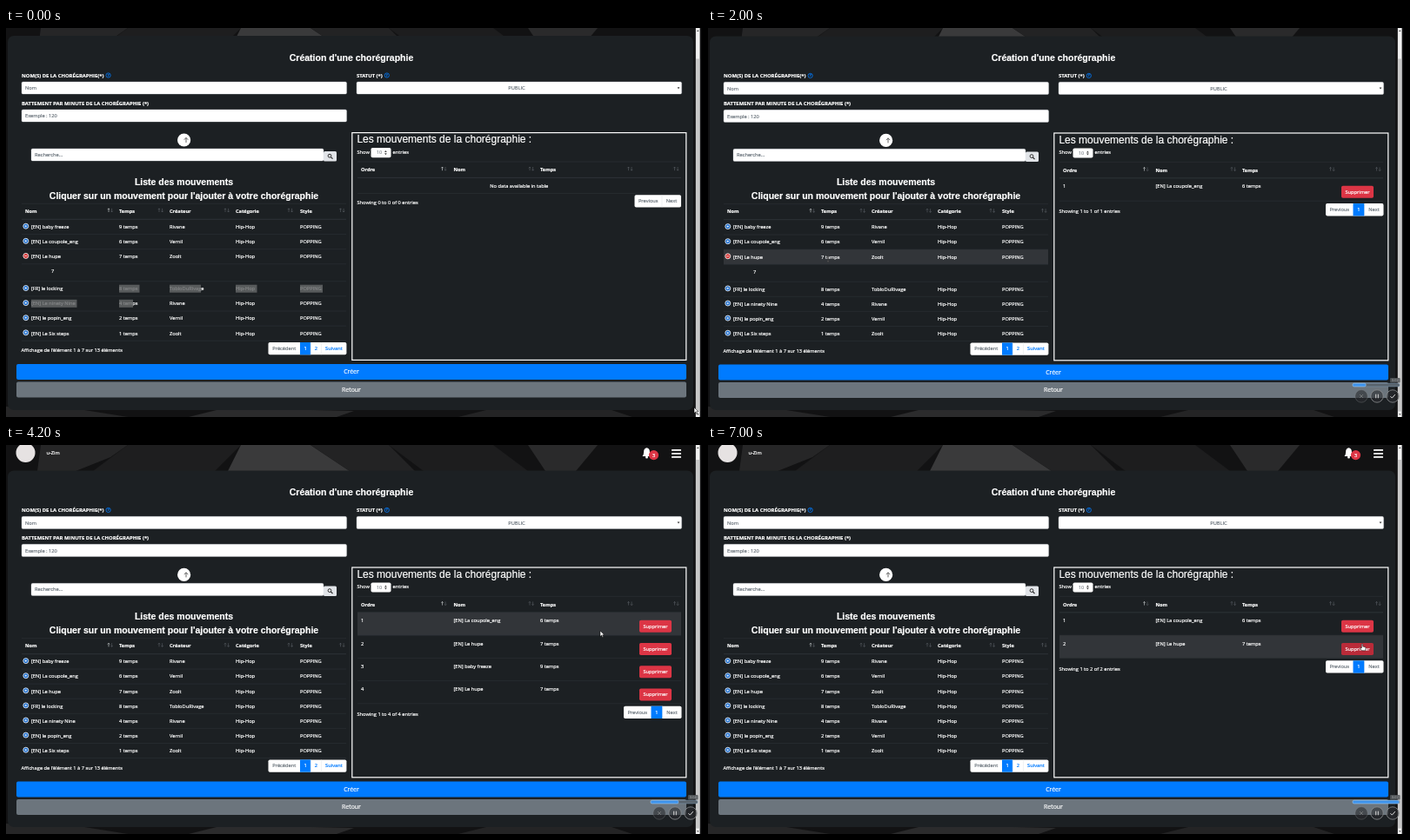
Write an HTML page that moves like this. It is 800 by 448 pixels and loops after 7.1 s.

```html
<!DOCTYPE html>
<html lang="fr">
<head>
<meta charset="utf-8">
<title>Création d'une chorégraphie</title>
<style>
html, body { margin: 0; width: 100%; height: 100%; overflow: hidden; background: #0b0b0c; }
svg { display: block; width: 800px; height: 448px; font-family: "Open Sans", "Noto Sans", sans-serif; }
text { stroke-width: .2px; }
.h { font-family: "Liberation Sans", Arial, sans-serif; }
</style>
</head>
<body>
<svg id="stage" viewBox="0 0 800 448"></svg>
<script>
const LOOP = 7100, STEP = 100;
const WHITE = '#fff', MUTED = '#6c757d', BLUE = '#007bff', RED = '#dc3545';
const CARD = '#1c2023', LINE = '#2d3237', HOVER = '#323539';
const stage = document.getElementById('stage');

const moves = [
  ['[EN] baby freeze', 9, 'Rivane'],
  ['[EN] La coupole_eng', 6, 'Vernil'],
  ['[EN] Le hupe', 7, 'Zoolt'],
  ['[FR] le locking', 8, 'TobloDuRivage'],
  ['[EN] Le ninety Nine', 4, 'Rivane'],
  ['[EN] le popin_eng', 2, 'Vernil'],
  ['[EN] Le Six steps', 1, 'Zoolt']
];
const FREEZE = 0, COUPOLE = 1, HUPE = 2;

// Moments of the clicks
const AT = { widget: 200, add1: 1700, add2: 2200, add3: 2700, fold: 3400, add4: 3800,
             grab: 5000, drop: 5700, del1: 6200, del2: 6600 };

// Pointer tip: time, x, y
const path = [
  [0, 791, 437], [100, 789, 437], [800, 695, 409], [1600, 140, 247], [1700, 140, 248],
  [2000, 138, 266], [2200, 136, 264], [2500, 100, 232], [2700, 88, 230], [3100, 30, 269.5],
  [3400, 22, 263], [3700, 60, 283], [3800, 62, 283], [4200, 683, 214], [4800, 620, 207],
  [5000, 539, 273], [5600, 539, 244], [5800, 560, 246], [6200, 746, 259], [6600, 747, 259],
  [7000, 752, 229]
];
// Pointer shape from each time on
const shapes = [[0, 'arrow'], [600, 'hand'], [1400, 'beam'], [2900, 'hand'], [3500, 'beam'],
                [3900, 'arrow'], [4900, 'beam'], [5800, 'arrow'], [6000, 'hand']];

function pointer(t) {
  let i = 0;
  while (i < path.length - 2 && t >= path[i + 1][0]) i++;
  const [t0, x0, y0] = path[i], [t1, x1, y1] = path[i + 1];
  const k = Math.min(1, (t - t0) / (t1 - t0)), s = k * k * (3 - 2 * k);
  const kind = shapes.filter(p => p[0] <= t).pop()[1];
  return { x: x0 + (x1 - x0) * s, y: y0 + (y1 - y0) * s, kind };
}

const rect = (x, y, w, h, fill, r = 0, more = '') =>
  `<rect x="${x}" y="${y}" width="${w}" height="${h}" rx="${r}" fill="${fill}" ${more}/>`;
const circle = (x, y, r, fill, more = '') => `<circle cx="${x}" cy="${y}" r="${r}" fill="${fill}" ${more}/>`;
const stroke = (d, color, w, more = '') =>
  `<path d="${d}" fill="none" stroke="${color}" stroke-width="${w}" ${more}/>`;
const group = (x, y, body, more = '') => `<g transform="translate(${x} ${y})" ${more}>${body}</g>`;
// y is the middle of the capitals
const text = (x, y, s, { size = 5.7, fill = WHITE, bold, mid, head } = {}) =>
  `<text x="${x}" y="${y + size * 0.35}" font-size="${size}" fill="${fill}" stroke="${fill}"` +
  (bold ? ' font-weight="700"' : '') + (mid ? ' text-anchor="middle"' : '') +
  (head ? ' class="h"' : '') + `>${s}</text>`;
const hline = (x0, x1, y, color = LINE, w = 0.6) => stroke(`M${x0} ${y}H${x1}`, color, w);
const field = (x, y, w) => rect(x, y, w, 14.2, WHITE, 1.6, 'stroke="#ced4da" stroke-width=".3"');

function sorter(x, y, active) {
  return stroke(`M${x} ${y + 2}v-4.2m-1.2 1.3l1.2 -1.3l1.2 1.3`, active ? '#d5d8da' : '#5b6167', 0.6) +
         stroke(`M${x + 3.6} ${y - 2.2}v4.2m-1.2 -1.3l1.2 1.3l1.2 -1.3`, '#5b6167', 0.6);
}

function photo() {
  const poly = (pts, fill) => `<polygon points="${pts}" fill="${fill}"/>`;
  return rect(0, 0, 800, 448, '#121213') +
    poly('40,0 140,0 120,14 80,30 36,30', '#262627') +
    poly('140,0 270,0 240,30 100,30', '#1e1e1f') +
    poly('270,0 350,0 395,30 255,30', '#3a3a3b') +
    poly('350,0 440,0 470,30 395,30', '#232324') +
    poly('440,0 560,0 600,30 480,30', '#1d1d1e') +
    poly('600,0 680,0 655,30 620,30', '#2a2a2b') +
    poly('0,436 90,440 140,448 0,448', '#262627') +
    poly('210,448 250,438 400,441 380,448', '#2b2b2c') +
    poly('520,448 560,438 690,438 720,448', '#242425');
}

function navbar() {
  return circle(22.5, -11.5, 11, '#e6e2e2') + text(46.5, -11.5, 'u-Zim') +
    `<path d="M731.5 -7.5q1.6 -1.5 1.6 -5q0 -4 3.4 -4.6q3.4 .6 3.4 4.6q0 3.500 1.6 5z" fill="#fff"/>` +
    circle(736.5, -6.5, 1.5, WHITE) + circle(744.5, -8.8, 5.6, RED) +
    text(744.5, -8.8, '3', { size: 5.6, mid: true }) +
    [-15.4, -11.4, -7.4].map(y => rect(765, y, 11, 1.7, WHITE, 0.5)).join('');
}

function help(x, y) {
  return circle(x, y, 2.6, 'none', `stroke="${BLUE}" stroke-width=".8"`) +
    text(x, y, '?', { size: 4, fill: BLUE, bold: true, mid: true });
}

function form() {
  const label = (x, y, s) => text(x, y, s, { size: 5.87, bold: true });
  const hint = (x, y, s) => text(x, y, s, { fill: MUTED });
  const title = (x, y, s) => text(x, y, s, { size: 10.5, bold: true, mid: true, head: true });
  return title(397, 34, "Création d'une chorégraphie") +
    label(18, 54.5, 'NOM(S) DE LA CHORÉGRAPHIE(*)') + help(117.6, 54.5) +
    field(18, 61.9, 373.6) + hint(22, 69.2, 'Nom') +
    label(403, 54.5, 'STATUT (*)') + help(437.8, 54.5) +
    field(403, 61.9, 373.6) + text(587, 69.2, 'PUBLIC', { fill: MUTED, mid: true }) +
    '<path d="M771.6 68.200h2.800l-1.4 2z" fill="#333"/>' +
    label(18, 86.5, 'BATTEMENT PAR MINUTE DE LA CHORÉGRAPHIE (*)') +
    field(18, 93.9, 373.6) + hint(22, 101.2, 'Exemple : 120') +
    circle(204.6, 129, 7.6, WHITE) + stroke('M207 132v-5.600m-2.200 2.300l2.200 -2.300l2.200 2.300', '#555', 0.9) +
    field(29, 138.9, 336) + hint(33, 146, 'Recherche...') +
    rect(365, 142, 15, 11.5, '#e1e4e8', 1.5) +
    circle(372, 147.2, 1.9, 'none', 'stroke="#222" stroke-width=".9"') +
    stroke('M373.4 148.600l2.100 2.100', '#222', 1.1) +
    title(204.5, 177, 'Liste des mouvements') +
    title(204.5, 193, "Cliquer sur un mouvement pour l'ajouter à votre chorégraphie");
}

function toggle(y, open) {
  return circle(22.8, y - 0.8, 3, open ? '#d33333' : '#0d62c8', 'stroke="#fff" stroke-width=".8"') +
    stroke(`M21.4 ${y - 0.8}h2.8` + (open ? '' : `m-1.4 -1.4v2.8`), WHITE, 0.8);
}

const ROW = 17.1, TOP = 220.5, DETAIL = 20;

function moveList(t, p, dy) {
  const open = t < AT.fold;
  const cols = [[22, 'Nom', 118], [130, 'Temps', 176], [188, 'Créateur', 252], [264, 'Catégorie', 325], [338, 'Style', 384.5]];
  let out = hline(18, 391, 202.3);
  cols.forEach(([x, s, sx], i) => {
    out += text(x, 211, s, { size: 5.6, bold: true }) + sorter(sx, 210, i === 0);
  });
  out += hline(18, 391, TOP - 0.2, LINE, 1);
  moves.forEach(([name, beats, author], i) => {
    const y = TOP + ROW * i + (open && i > HUPE ? DETAIL : 0), mid = y + 8.5, my = p.y - dy;
    if (p.kind !== 'hand' && p.x > 18 && p.x < 391 && my >= y && my < y + ROW) out += rect(18, y, 373, ROW, HOVER);
    out += hline(18, 391, y + ROW) + toggle(mid, open && i === HUPE);
    [name, beats + ' temps', author, 'Hip-Hop', 'POPPING'].forEach((s, c) => {
      out += text(c ? cols[c][0] : 29, mid, s);
    });
  });
  if (open) {
    const y = TOP + ROW * 3;
    out += text(52, y + 8.5, '7') + hline(18, 391, y + DETAIL);
  }
  if (t < AT.add1) {
    const mark = (x, w, y) => rect(x, y - 4.6, w, 9, '#66686a', 0, 'opacity=".82"');
    const y = TOP + ROW * 3 + DETAIL + 8.5;
    out += mark(130, 23.5, y) + mark(188, 36, y) + mark(264, 24.5, y) + mark(338, 26, y) +
      mark(29, 52.5, y + ROW) + mark(130, 16, y + ROW);
  }
  return out;
}

// Cells: [label, width, state]
function pager(x, y, cells) {
  const total = cells.reduce((n, c) => n + c[1], 0);
  let out = rect(x, y, total, 14.3, WHITE, 1.8);
  cells.forEach(([s, w, state], i) => {
    if (state === 'on') out += rect(x, y, w, 14.3, BLUE);
    else if (i) out += stroke(`M${x} ${y}v14.3`, '#dee2e6', 0.5);
    const fill = { on: WHITE, off: MUTED }[state] || BLUE;
    out += text(x + w / 2, y + 7.1, s, { fill, mid: true });
    x += w;
  });
  return out;
}

function chosen(t) {
  const list = [];
  if (t >= AT.add1) list.push(COUPOLE);
  if (t >= AT.add2) list.push(HUPE);
  if (t >= AT.add3 && t < AT.del2) list.push(FREEZE);
  if (t >= AT.add4 && t < AT.del1) list.push(HUPE);
  return list;
}

function pickRow(y, order, id, button) {
  const [name, beats] = moves[id];
  return text(408, y + 9.5, order) + text(514.5, y + 9.5, name) + text(614, y + 9.5, beats + ' temps') +
    rect(728, y + 8.8, 37, 14, button, 1.8) + text(746.5, y + 15.8, 'Supprimer', { mid: true });
}

function picks(t, p, dy, bottom) {
  const list = chosen(t), n = list.length, H = 26.2, top = 172.6, my = p.y - dy;
  const drag = t >= AT.grab && t < AT.drop;
  const swapped = t >= AT.grab && t < AT.del1 && (t >= AT.drop || my < top + 3 * H - 8);
  const order = list.map((_, i) => i + 1);
  if (swapped) {
    [list[2], list[3]] = [list[3], list[2]];
    if (drag) [order[2], order[3]] = [4, 3];
  }
  let out = rect(397.8, 120.6, 384, bottom - 120.6, 'none', 0, 'stroke="#fff" stroke-width="1.2"') +
    text(403.4, 128, 'Les mouvements de la chorégraphie :', { size: 12, head: true }) +
    text(403.5, 143, 'Show') + rect(419.5, 138, 23, 11.2, WHITE, 1.8) +
    text(426, 143.6, '10', { fill: '#8b9197', size: 5.4 }) +
    '<path d="M435 143l1.400 -2l1.400 2zm0 1.200l1.400 2l1.400 -2z" fill="#444"/>' +
    text(444.5, 143, 'entries') + hline(404, 776, 154);
  [[408, 'Ordre', 501.5], [514.5, 'Nom', 602], [614, 'Temps', 715.5], [0, '', 768.5]].forEach(([x, s, sx], i) => {
    out += text(x, 163.2, s, { size: 5.6, bold: true }) + sorter(sx, 162.2, i === 0);
  });
  out += hline(404, 776, top - 0.2, LINE, 1);
  if (!n) out += text(589.8, 181.6, 'No data available in table', { mid: true }) + hline(404, 776, 190.5);

  list.forEach((id, i) => {
    const y = top + H * i, over = !drag && p.x > 404 && p.x < 776 && my >= y && my < y + H;
    const press = over && p.kind === 'hand' && p.x > 728 && p.x < 765;
    if (over) out += rect(404, y, 372, H, HOVER);
    out += pickRow(y, order[i], id, press ? '#b92b39' : RED) + hline(404, 776, y + H);
  });

  const foot = n ? 184.8 + H * n : 201.5;
  out += text(403.5, foot, `Showing ${n ? 1 : 0} to ${n} of ${n} entries`);
  const page = n ? [['1', 13, 'on']] : [];
  out += pager(n ? 710 : 722.5, foot - 9.3, [['Previous', 31.5, 'off'], ...page, ['Next', 22, 'off']]);

  if (drag) {
    const y = top + 3 * H + my - 252;
    out += group(2, y, rect(402, 0, 372, 27.2, '#2b3035', 0, 'opacity=".93" stroke="#3d5266" stroke-width=".7"') +
      hline(402, 774, 27.2, '#888', 0.6) + pickRow(-1.2, 4, HUPE, '#cf3947'), 'opacity=".94"');
  }
  return out;
}

function footer(t, p) {
  const over = y => p.x > 12 && p.x < 782 && p.y >= y && p.y < y + 18.5;
  const bar = (y, s, color, dark) => rect(12, y, 770, 18, over(y) ? dark : color, 2) +
    text(397, y + 9, s, { size: 6.9, mid: true });
  return text(17.5, 371.5, "Affichage de l'élément 1 à 7 sur 13 éléments") +
    pager(301.5, 362, [['Précédent', 36.5, 'off'], ['1', 12.2, 'on'], ['2', 12.2], ['Suivant', 29]]) +
    bar(387, 'Créer', BLUE, '#0069d9') + bar(407.6, 'Retour', MUTED, '#5a6268');
}

function scrollbar(folded) {
  const y = folded ? 17 : 35.5;
  return rect(792.8, 0, 7.2, 448, '#0a0a0b') + rect(792.8, 0, 4.8, 448, '#f1f1f1') +
    rect(793.2, y, 4, 441.5 - y, '#c8c8c8') +
    '<path d="M794 4l1.300 -1.800l1.300 1.800zm0 440.200l1.300 1.800l1.300 -1.800z" fill="#505050"/>';
}

function recorder(t) {
  const ring = (x, o) => circle(x, 424, 7.2, '#2a2c2e', `fill-opacity=".6" stroke="#8b8e90" stroke-width=".9" stroke-opacity="${o}"`);
  return rect(784, 403, 11.5, 5.6, '#54585b', 1, 'opacity=".9"') +
    text(789.8, 405.8, '0:0' + Math.floor(t / 1000), { size: 3.8, fill: '#85898c', mid: true }) +
    rect(741, 409.3, 54, 3.6, '#59636c', 1.6, 'stroke="#7d9ab5" stroke-width=".5"') +
    rect(741, 409.3, 54 * t / LOOP, 3.6, '#3d92ea', 1.6, 'stroke="#a9d0f7" stroke-width=".5"') +
    ring(751, 0.35) + stroke('M749 422l4 4m0 -4l-4 4', '#6f7274', 1) +
    ring(769, 0.9) + stroke('M767.700 421.700v4.600m2.600 -4.600v4.600', '#d8d8d8', 1) +
    ring(787, 0.9) + stroke('M784.400 424.200l1.900 1.900l3.500 -4', '#d8d8d8', 1);
}

function cursor({ x, y, kind }) {
  const solid = d => `<path d="${d}" fill="#fff" stroke="#000" stroke-width=".5" stroke-linejoin="round"/>`;
  const beam = 'M-1.200 -3h2.400m-1.200 0v6m-1.200 0h2.400';
  const art = {
    arrow: solid('M0 0v6.600l1.600 -1.500l1.100 2.500l1 -.5l-1.100 -2.400h2.200z'),
    hand: solid('M-.7 .3q.7 -.8 1.400 0v2.800l2.700 .7q.7 .3 .6 1.200l-.5 2.800h-3.800l-2.300 -3q.3 -.9 1.900 .2z'),
    beam: stroke(beam, '#000', 1.1) + stroke(beam, '#b5b5b5', 0.45)
  };
  return group(x, y, art[kind]);
}

function draw(t) {
  const p = pointer(t), folded = t >= AT.fold;
  const nudge = t < AT.add1 ? 0 : 0.4, dy = nudge + (folded ? 20 : 0);
  stage.innerHTML = photo() + group(0, dy, navbar()) +
    rect(2, 9 + dy, 788, 431 - dy, CARD, 7) +
    group(0, dy, form() + moveList(t, p, dy) + picks(t, p, dy, 382.4 + nudge - dy)) +
    group(0, nudge, footer(t, p)) + scrollbar(folded) +
    (t >= AT.widget ? recorder(t) : '') + cursor(p);
}

const start = performance.now();
let shown = -1;
function tick() {
  const t = Math.floor((performance.now() - start) % LOOP / STEP) * STEP;
  if (t !== shown) draw(shown = t);
  requestAnimationFrame(tick);
}
tick();
</script>
</body>
</html>
```
